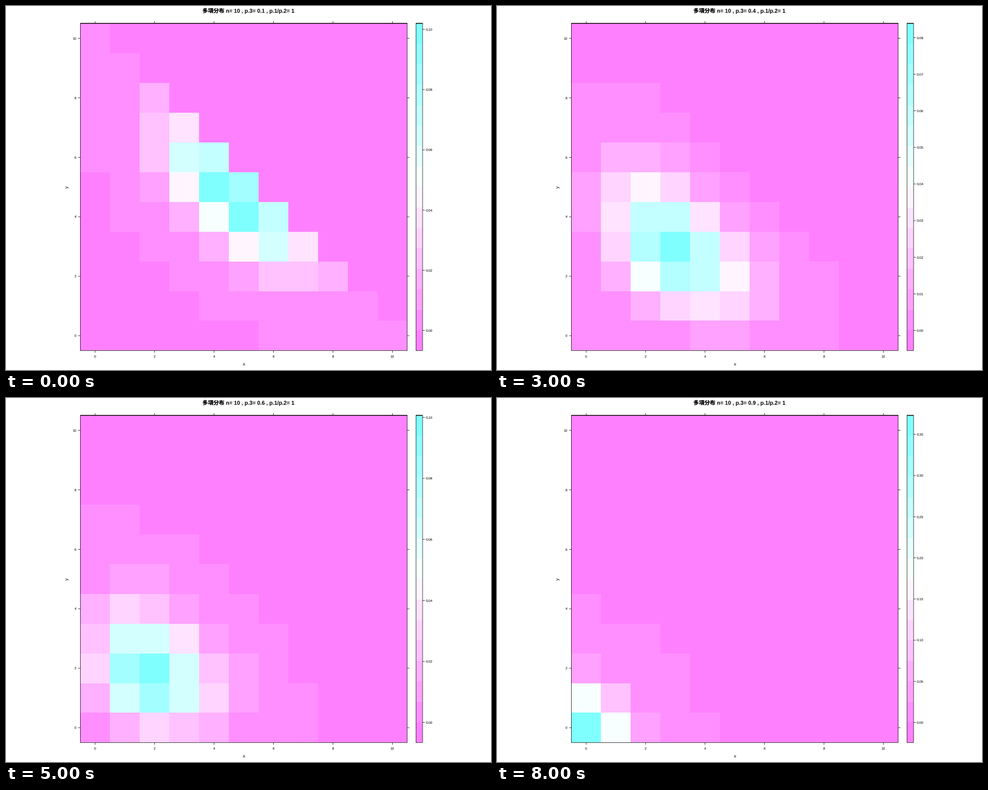
These frames come from a looping animation (864x648 px, 9000 ms). A matplotlib script:

```python
import math

import matplotlib.pyplot as plt
import numpy as np
from matplotlib.animation import FuncAnimation

W, H = 864, 648
N, BANDS, PAD = 10, 16, 0.07
LEFT, RIGHT, TOP, BOTTOM = 132.45, 714.75, 30.95, 613.4
KEY_L, KEY_R = 730.3, 742.1
TICK = 4

plt.rcParams["font.family"] = ["Liberation Sans", "Noto Sans CJK JP"]
plt.rcParams["text.hinting"] = "none"

fig = plt.figure(figsize=(W / 72, H / 72), dpi=72, facecolor="white")
ax = fig.add_axes([0, 0, 1, 1])


def band_colors():
    """Magenta to white to cyan, sampled at BANDS steps out of 100."""
    colors = []
    for i in range(BANDS):
        j = i * 99 // (BANDS - 1)
        if j < 50:
            colors.append((1, 0.5 + 0.01 * j, 1))
        else:
            colors.append((1 - 0.01 * (j - 49), 1, 1))
    return np.array(colors)


COLORS = band_colors()


def multinomial(p3):
    p = (1 - p3) / 2
    z = np.zeros((N + 1, N + 1))
    for y in range(N + 1):
        for x in range(N + 1 - y):
            ways = math.comb(N, x) * math.comb(N - x, y)
            z[y, x] = ways * p ** (x + y) * p3 ** (N - x - y)
    return z


def nice_step(span, count=7):
    cell = span / count
    base = 10 ** math.floor(math.log10(cell))
    step = base
    for mult, bias in ((2, 1.5), (5, 2.75), (10, 1.5)):
        if mult * base - cell < bias * (cell - step):
            step = mult * base
        else:
            break
    return step


def line(xs, ys):
    ax.plot(xs, ys, color="black", lw=0.7, snap=False,
            solid_capstyle="butt", solid_joinstyle="miter")


def frame_box(x0, x1):
    line([x0, x1, x1, x0, x0, x1], [TOP, TOP, BOTTOM, BOTTOM, TOP, TOP])


def label(x, y, text, size=6.4, **kw):
    ax.text(x, y, text, fontsize=size, color="black", **kw)


def cells(x0, x1, colors):
    rows, cols = colors.shape[:2]
    ax.pcolormesh(np.linspace(x0, x1, cols + 1),
                  np.linspace(BOTTOM, TOP, rows + 1),
                  colors, antialiased=False, edgecolors="none")


def draw_axes():
    size = (RIGHT - LEFT) / (N + 1)
    for v in range(0, N + 1, 2):
        x = LEFT + (v + 0.5) * size
        y = BOTTOM - (v + 0.5) * size
        line([x, x], [BOTTOM, BOTTOM + TICK])
        line([x, x], [TOP, TOP - TICK])
        line([LEFT, LEFT - TICK], [y, y])
        line([RIGHT, RIGHT + TICK], [y, y])
        label(x, 625.8, str(v), ha="center")
        label(125.4, y + 2.3, str(v), ha="right")
    label(423.6, 639.7, "x", 8, ha="center")
    label(108.5, 322.3, "y", 8, ha="center", va="center", rotation=90)


def draw_key(peak):
    cells(KEY_L, KEY_R, COLORS[:, None])
    frame_box(KEY_L, KEY_R)
    low, span = -PAD * peak, (1 + 2 * PAD) * peak
    step = nice_step(span)
    for k in range(int((low + span) / step) + 1):
        y = BOTTOM - (k * step - low) / span * (BOTTOM - TOP)
        line([KEY_R, KEY_R + TICK], [y, y])
        label(747.9, y + 2.3, f"{k * step:.2f}")


def update(i):
    ax.cla()
    ax.set(xlim=(0, W), ylim=(H, 0))
    ax.axis("off")
    p3 = (i + 1) / 10
    z = multinomial(p3)
    peak = z.max()
    level = ((z / peak + PAD) / (1 + 2 * PAD) * BANDS).astype(int)
    cells(LEFT, RIGHT, COLORS[level])
    frame_box(LEFT, RIGHT)
    draw_axes()
    draw_key(peak)
    label(432, 11.7, f"多項分布 n= {N} , p.3= {p3:g} , p.1/p.2= 1", 9.75,
          ha="center", weight="bold")
    return []


anim = FuncAnimation(fig, update, frames=9, interval=1000,
                     init_func=lambda: update(0), repeat=True, repeat_delay=0)
plt.show()
```
